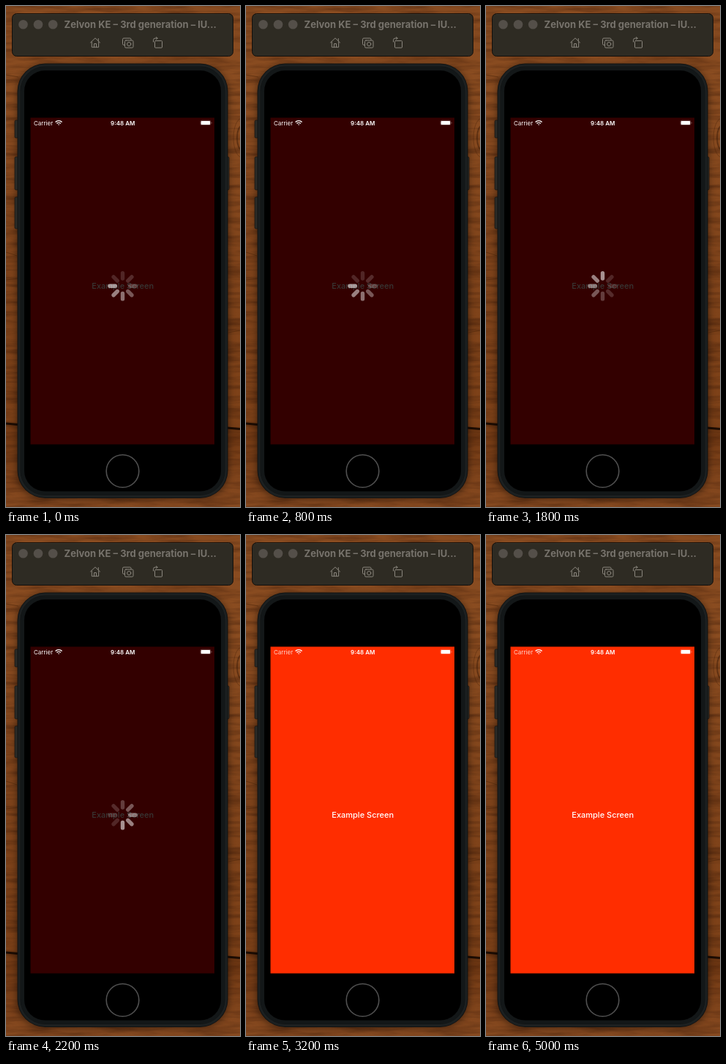
Write an HTML page that moves like this. It is 320 by 684 pixels and loops after 5100 ms.

```html
<!DOCTYPE html>
<html lang="en">
<head>
<meta charset="utf-8">
<title>Loading overlay</title>
<style>
  html, body { margin: 0; width: 100%; height: 100%; overflow: hidden; background: #7c431c; }
  svg { display: block; width: 320px; height: 684px; }
  text { font-family: Inter, "Noto Sans", sans-serif; white-space: pre; }
  .title { font-size: 13px; font-weight: 700; fill: #77736c; }
  .status { font-size: 8px; fill: #fff; }
  .icons { fill: none; stroke: #8b877e; stroke-width: 1; stroke-linejoin: round; stroke-linecap: round; }
  .grain { fill: none; stroke: #3a1a05; }
</style>
</head>
<body>
<svg viewBox="0 0 320 684" xmlns="http://www.w3.org/2000/svg">
  <defs>
    <linearGradient id="wood" x2="0" y2="1">
      <stop offset="0" stop-color="#884b20"/>
      <stop offset=".2" stop-color="#8a4c20"/>
      <stop offset=".5" stop-color="#80441b"/>
      <stop offset=".82" stop-color="#7d4118"/>
      <stop offset=".86" stop-color="#733a14"/>
      <stop offset="1" stop-color="#874a20"/>
    </linearGradient>
    <filter id="noise" x="0" y="0" width="1" height="1" color-interpolation-filters="sRGB">
      <feTurbulence type="fractalNoise" baseFrequency=".015 .12" numOctaves="4" seed="7"/>
      <feColorMatrix values="0 0 0 0 .2  0 0 0 0 .08  0 0 0 0 .02  1 0 0 0 -.4"/>
    </filter>
    <filter id="soft" x="-.2" y="-.2" width="1.4" height="1.4">
      <feGaussianBlur stdDeviation="5"/>
    </filter>
  </defs>

  <!-- desk -->
  <rect width="320" height="684" fill="url(#wood)"/>
  <rect width="320" height="684" filter="url(#noise)"/>
  <g class="grain">
    <path d="M0 570 16 571.500M303 576 320 577.500" stroke="#1c0c03" stroke-width="3"/>
    <path d="M0 94 17 97M0 336 15 341M0 374 16 372M304 446 320 443" opacity=".35"/>
    <ellipse cx="323" cy="180" rx="7" ry="17" stroke-width="2" opacity=".5"/>
    <ellipse cx="323" cy="180" rx="12" ry="27" opacity=".3"/>
  </g>
  <rect x="14" y="80" width="291" height="594" rx="38" filter="url(#soft)" opacity=".4"/>

  <!-- window bar -->
  <rect x="8.5" y="10.5" width="302" height="58" rx="6" fill="#2e2b23" stroke="#120e0a"/>
  <path d="M14 11.5H305" stroke="#3f3b32" stroke-width=".7"/>
  <g fill="#544f49">
    <circle cx="23.5" cy="25.3" r="6.3"/>
    <circle cx="44" cy="25.3" r="6.3"/>
    <circle cx="64.2" cy="25.3" r="6.3"/>
  </g>
  <text class="title" x="79.5" y="29.5">Zelvon KE – 3rd generation – lU...</text>
  <g class="icons">
    <path d="M115.5 50 122 43.8 128.5 50M117.3 49v7.2h9.4V49M120.5 56v-4.5h3V56M126.3 47.5v-3"/>
    <path d="M162 53.2h-1a1.5 1.5 0 0 1-1.5-1.5v-6.2a1.5 1.5 0 0 1 1.5-1.5h8.5a1.5 1.5 0 0 1 1.5 1.5v1"/>
    <rect x="162.5" y="47" width="11.5" height="10" rx="1.5"/>
    <circle cx="168.2" cy="52" r="2.6"/>
    <rect x="203.5" y="47.5" width="10" height="9.5" rx="1"/>
    <path d="M201.5 49v-2.500a2.500 2.500 0 0 1 2.500-2.500h3M205.5 42.5l1.700 1.500-1.700 1.700"/>
  </g>

  <!-- phone -->
  <g fill="#2b2a26" stroke="#171512" stroke-width=".8">
    <rect x="12" y="156" width="7" height="24" rx="1.5"/>
    <rect x="12" y="206" width="7" height="45" rx="1.5"/>
    <rect x="12" y="261" width="7" height="43" rx="1.5"/>
    <rect x="300" y="206" width="5" height="45" rx="1.5"/>
  </g>
  <rect x="15.5" y="78.5" width="288" height="593.5" rx="38" fill="#101212"/>
  <rect x="18" y="81" width="283" height="588.5" rx="35.5" fill="none" stroke="#1c2021" stroke-width="3"/>
  <rect x="22.5" y="85.5" width="274" height="579.5" rx="31" fill="none" stroke="#131718" stroke-width="5"/>
  <rect x="25" y="88" width="269" height="574.5" rx="28.5" fill="#000"/>
  <circle cx="159.5" cy="635" r="22.3" fill="#000" stroke="#505050" stroke-width="1.6"/>

  <!-- screen -->
  <rect id="page" x="33.5" y="152.5" width="251.5" height="446"/>
  <text id="label" x="159.7" y="386.3" text-anchor="middle" font-size="11" font-weight="500">Example Screen</text>
  <g id="spinner" transform="translate(159.5 382.3)" fill="#fff"></g>

  <text id="carrier" class="status" x="38" y="162.7">Carrier</text>
  <text class="status" x="159.7" y="162.7" text-anchor="middle" font-weight="600">9:48 AM</text>
  <g fill="none" stroke="#fff" stroke-width="1.4">
    <path d="M67.6 158.5a6.3 6.3 0 0 1 9 0M69.5 160.4a3.7 3.7 0 0 1 5.2 0"/>
    <path d="M70.9 161.6 72.1 163l1.2-1.4z" fill="#fff" stroke="none"/>
  </g>
  <rect x="266.6" y="156.9" width="12.6" height="5" rx="1" fill="#fff"/>
  <rect x="265.9" y="156.2" width="14" height="6.4" rx="1.8" fill="none" stroke="#fff" stroke-width=".6" opacity=".35"/>
  <path d="M280.8 158.4a1.2 1.2 0 0 1 0 2.2z" fill="#fff" opacity=".5"/>
</svg>
<script>
const LOOP = 5100, STEP = 100, LOADED = 2300, SPOKES = 8, FIRST = 6;
// Opacity by distance behind the leading spoke
const FADE = [.57, .5, .44, .34, .24, .17, .15, .15];

const [page, label, spinner, carrier] =
  ['page', 'label', 'spinner', 'carrier'].map(id => document.getElementById(id));

const spokes = Array.from({ length: SPOKES }, (_, i) => {
  const r = document.createElementNS('http://www.w3.org/2000/svg', 'rect');
  const attrs = { x: -2.7, y: -20.3, width: 5.4, height: 12.8, rx: 2.7,
                  transform: `rotate(${i * 360 / SPOKES})` };
  for (const k in attrs) r.setAttribute(k, attrs[k]);
  return spinner.appendChild(r);
});

function draw(t) {
  const loading = t < LOADED;
  page.setAttribute('fill', loading ? '#330000' : '#ff2d00');
  label.setAttribute('fill', loading ? '#383634' : '#fff');
  carrier.setAttribute('opacity', loading ? 1 : .8);
  spinner.setAttribute('visibility', loading ? 'visible' : 'hidden');

  const lead = FIRST + Math.floor(t / STEP);
  spokes.forEach((s, i) =>
    s.setAttribute('opacity', FADE[(lead - i + SPOKES) % SPOKES]));
}

const start = performance.now();
function tick() {
  draw((performance.now() - start) % LOOP);
  requestAnimationFrame(tick);
}
tick();
</script>
</body>
</html>
```
